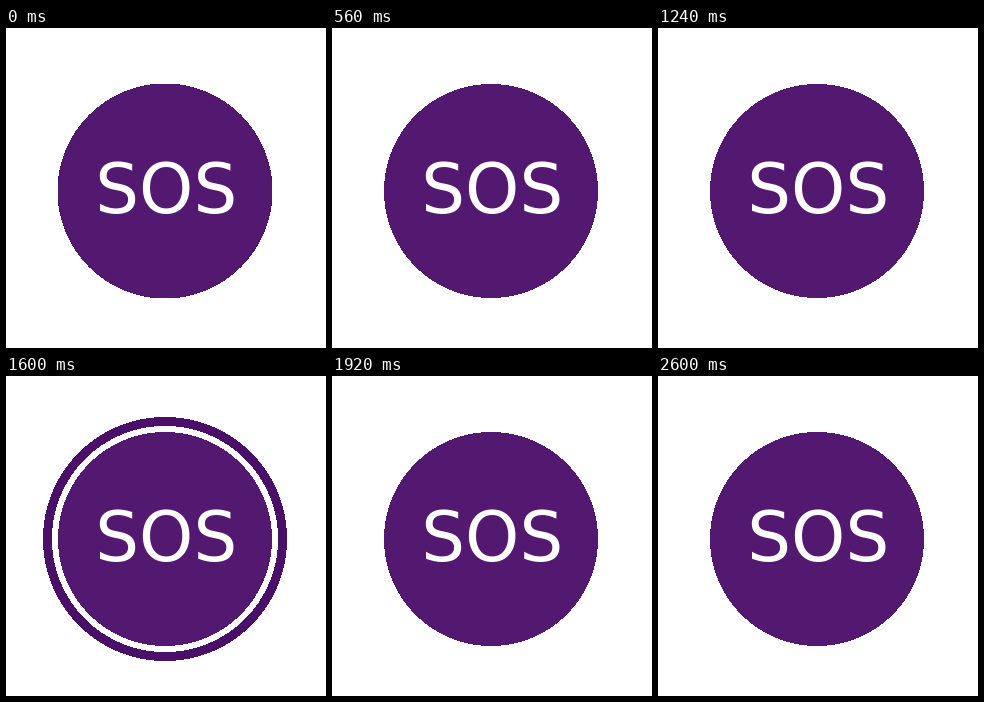
These frames come from a looping animation (320x320 px, 2720 ms). An HTML page with a canvas:

```html
<!DOCTYPE html>
<html lang="en">
<head>
<meta charset="utf-8">
<title>SOS pulse</title>
<style>
  html, body { margin: 0; width: 100%; height: 100%; overflow: hidden; background: #fff; }
  canvas { display: block; width: 320px; height: 320px; }
</style>
</head>
<body>
<canvas id="stage" width="320" height="320"></canvas>
<script>
const ctx = document.getElementById('stage').getContext('2d');
const CENTER = { x: 159, y: 163 };
const DISC_RADIUS = 107;
const PULSE = 680;
const VISIBLE = 560;
const STEP = 40;
const COLORS = { disc: '#53186f', ring: '#4a0f68', paper: '#fff' };

// Fills a circle row by row so that its edge stays hard.
function disc(radius, color) {
  ctx.fillStyle = color;
  for (let y = Math.floor(CENTER.y - radius); y < CENTER.y + radius; y++) {
    const dy = y + 0.5 - CENTER.y;
    const half = Math.sqrt(Math.max(0, radius * radius - dy * dy));
    const left = Math.round(CENTER.x - half);
    ctx.fillRect(left, y, Math.round(CENTER.x + half) - left, 1);
  }
}

// The ring's outer edge slows a little while its inner edge catches up.
function ring(t) {
  const outer = 107.5 + 0.0656 * t - 0.0000217 * t * t;
  const inner = 94.8 + 0.076 * t;
  disc(outer, COLORS.ring);
  if (inner > DISC_RADIUS) disc(inner, COLORS.paper);
}

function draw(time) {
  const t = Math.floor((time % PULSE) / STEP) * STEP;
  ctx.fillStyle = COLORS.paper;
  ctx.fillRect(0, 0, 320, 320);
  if (t < VISIBLE) ring(t);
  disc(DISC_RADIUS, COLORS.disc);
  ctx.fillStyle = '#fff';
  ctx.font = '69px "DejaVu Sans", sans-serif';
  ctx.fillText('SOS', 89.3, 185);
}

const start = performance.now();
function tick() {
  draw(performance.now() - start);
  requestAnimationFrame(tick);
}
tick();
</script>
</body>
</html>
```
